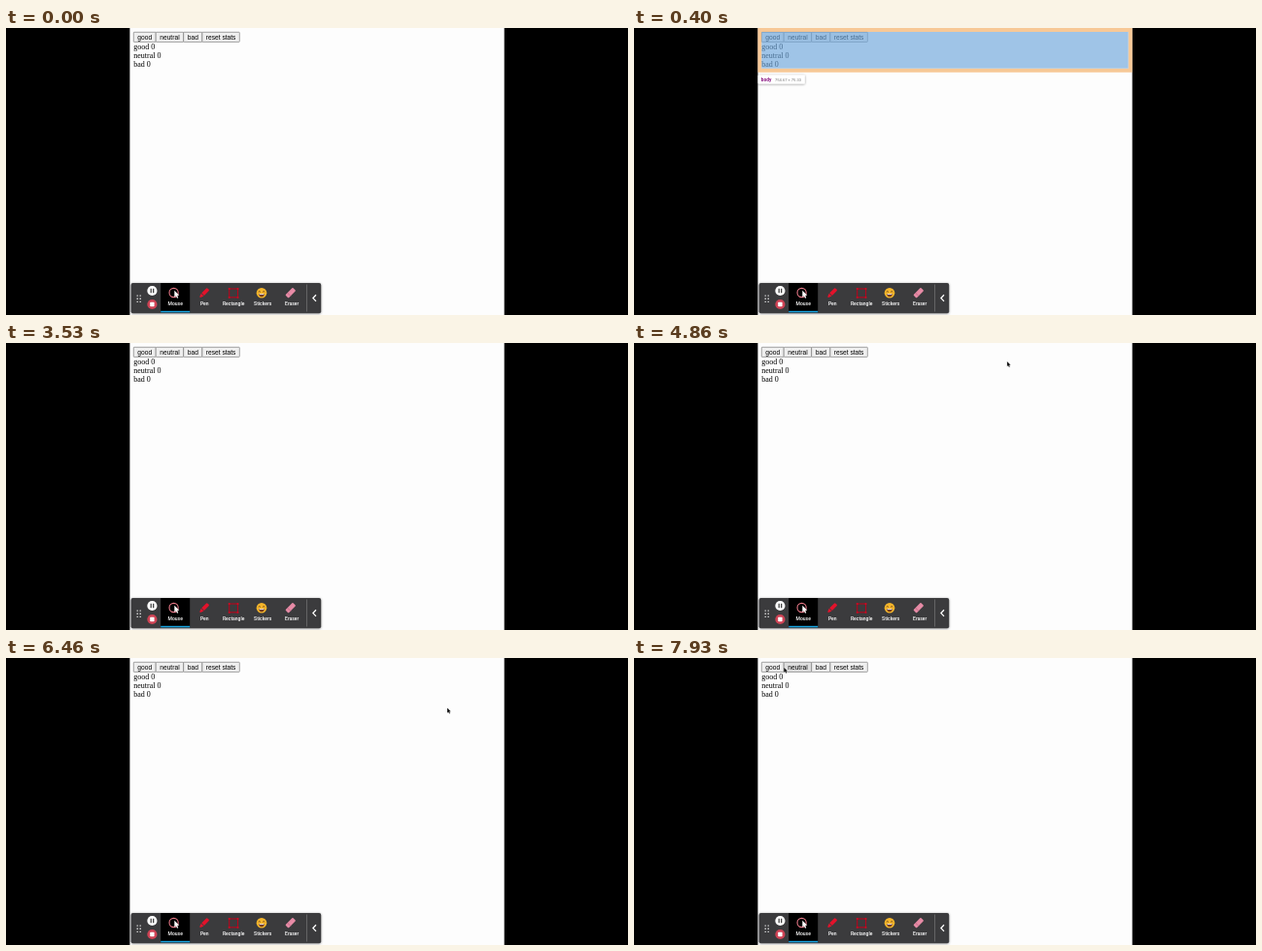
Write an HTML page that moves like this. It is 640 px wide and 296 px high and loops after 8000 ms.

```html
<!DOCTYPE html>
<html lang="en">
<head>
<meta charset="utf-8">
<title>Feedback counter</title>
<style>
  html, body { margin: 0; width: 100%; height: 100%; overflow: hidden; background: #000; }
  svg { display: block; width: 100%; height: 100%; }
  .stat { font: 8px "Liberation Serif", serif; }
  .button rect { fill: #efefef; stroke: #767676; stroke-width: .65; }
  .button.hover rect { fill: #dedede; }
  .button text { font: 6.667px "Liberation Sans", sans-serif; text-anchor: middle; }
  .label { font: 500 5px Roboto, sans-serif; fill: #fff; text-anchor: middle; }
  .tip { font: 4.1px Roboto, sans-serif; fill: #777; }
  .tip .tag { font-size: 4.8px; font-weight: 700; fill: #881280; }
</style>
</head>
<body>
<svg viewBox="0 0 640 296">
  <defs>
    <filter id="shadow" x="-10%" y="-30%" width="120%" height="160%">
      <feDropShadow dx="0" dy=".5" stdDeviation="1" flood-opacity=".45"/>
    </filter>
    <path id="arrow" d="M0 0V5.1L1.2 4L2 5.9L2.9 5.5L2.1 3.7H3.7Z"/>
    <clipPath id="pageClip"><rect x="127.4" width="385.3" height="296"/></clipPath>
  </defs>

  <rect x="127.4" width="385.3" height="296" fill="#fdfdfd"/>
  <g id="buttons"></g>
  <g class="stat">
    <text x="131.3" y="21.9">good 0</text>
    <text x="131.3" y="30.9">neutral 0</text>
    <text x="131.3" y="39.9">bad 0</text>
  </g>

  <g id="inspector">
    <path d="M127.4 0H512.7V45.7H127.4ZM131.3 4V41.7H508.6V4Z" fill="#f6b26b" fill-opacity=".7" fill-rule="evenodd"/>
    <rect x="131.3" y="4" width="377.3" height="37.7" fill="#6fa8dc" fill-opacity=".66"/>
    <g class="tip">
      <rect x="127.6" y="48.6" width="48.2" height="8.8" rx="1" fill="#fff" filter="url(#shadow)"/>
      <text class="tag" x="130.8" y="54.7">body</text>
      <text x="145" y="54.5">754.67 × 75.33</text>
    </g>
  </g>

  <g id="toolbar">
    <rect x="128.6" y="263" width="195.6" height="31.2" rx="2" fill="#3a3a3c" filter="url(#shadow)"/>
    <path d="M135.2 275.5v7.5M138.2 275.5v7.5" stroke="#ddd" stroke-width="1.3" stroke-dasharray="1.3 1.8"/>
    <circle cx="150.4" cy="271" r="5.1" fill="#fff"/>
    <path d="M149.2 268.8v4.4M151.7 268.8v4.4" stroke="#333" stroke-width="1.2"/>
    <circle cx="150.4" cy="285" r="5.1" fill="#cf4355"/>
    <rect x="148.2" y="282.8" width="4.4" height="4.4" rx=".7" fill="#fff"/>

    <rect x="159.2" y="263" width="30" height="30.2" fill="#000"/>
    <rect x="159.2" y="291.8" width="30" height="1.5" fill="#16a3e0"/>
    <circle cx="172.6" cy="273" r="4.6" fill="none" stroke="#e87888" stroke-width="1.1"/>
    <use href="#arrow" transform="translate(173.3 270.8) scale(1.35)" fill="#fff"/>

    <g transform="translate(204 273.2) rotate(45)" fill="#e3122b">
      <path d="M-1.9 -5.2Q0 -6.6 1.9 -5.2V2H-1.9ZM-1.9 2.7H1.9L.6 6.2H-.6Z"/>
    </g>
    <rect x="229.7" y="269" width="8.8" height="8.8" fill="none" stroke="#b3061d" stroke-width="1.1"/>
    <path d="M228.8 269h1.8M237.6 269h1.8M228.8 277.8h1.8M237.6 277.8h1.8" stroke="#c90a22" stroke-width="1.8"/>

    <circle cx="263" cy="273.2" r="5.3" fill="#f6b62b"/>
    <path d="M259.7 272.3q1.1-1.6 2.2 0M264.1 272.3q1.1-1.6 2.2 0" fill="none" stroke="#60381b" stroke-width=".8"/>
    <path d="M260 274.1H266Q265.5 277.3 263 277.3T260 274.1Z" fill="#6b321c"/>
    <path d="M260.5 274.2h5v.9h-5Z" fill="#fff"/>

    <g transform="translate(292.8 273.1) rotate(45)">
      <rect x="-2.3" y="-5.4" width="4.6" height="10.8" rx=".9" fill="#e78ba6"/>
      <path d="M-2.3 2.3H2.3" stroke="#b75f7c" stroke-width=".7"/>
    </g>

    <g class="label">
      <text x="174.2" y="286.4">Mouse</text>
      <text x="204.2" y="286.4">Pen</text>
      <text x="234.2" y="286.4">Rectangle</text>
      <text x="264.2" y="286.4">Stickers</text>
      <text x="294.2" y="286.4">Eraser</text>
    </g>
    <path d="M309.5 264.5V292.5" stroke="#777" stroke-width=".7"/>
    <path d="M319 275.3L315.9 278.6L319 281.9" fill="none" stroke="#fff" stroke-width="1.3"/>
  </g>

  <g clip-path="url(#pageClip)">
    <use id="cursor" href="#arrow" fill="#111" stroke="#fff" stroke-width=".6" paint-order="stroke"/>
  </g>
</svg>

<script>
const LOOP = 8000, STEP = 200 / 3;
const BUTTON_TOP = 4.3, BUTTON_HEIGHT = 10.1;
const $ = id => document.getElementById(id);

const buttons = [
  ["good", 131.3, 22.9], ["neutral", 154.2, 28.5],
  ["bad", 182.7, 19.2], ["reset stats", 201.9, 38.4]
].map(([label, x, width]) => {
  $("buttons").insertAdjacentHTML("beforeend",
    `<g class="button"><rect x="${x}" y="${BUTTON_TOP}" width="${width}" height="${BUTTON_HEIGHT}" rx=".6"/>
     <text x="${x + width / 2}" y="11.7">${label}</text></g>`);
  return { x, width, node: $("buttons").lastElementChild };
});

// Pointer path: [time in ms, x, y]
const path = [
  [4860, 384, 19], [5260, 236, 60], [5460, 233.5, 58], [5530, 232.8, 56.6],
  [5860, 280, -8], [6000, 288, 0], [6260, 491, 46], [6460, 454, 51.6],
  [6600, 462, 50], [6860, 460, 50], [7260, 280, 40], [7660, 164, 13],
  [7930, 154.3, 9.8], [8000, 154.3, 9.8]
];

function pointerAt(time) {
  const i = path.findIndex(key => key[0] > time);
  const [t0, x0, y0] = path[i - 1], [t1, x1, y1] = path[i];
  const p = (time - t0) / (t1 - t0), e = p * p * (3 - 2 * p);
  return [x0 + (x1 - x0) * e, y0 + (y1 - y0) * e];
}

function show(node, visible) {
  node.style.display = visible ? "" : "none";
}

function draw(now) {
  const time = Math.floor((now % LOOP + 7) / STEP) * STEP;
  show($("inspector"), time > 50 && time < 595);

  const pointerShown = time >= path[0][0];
  const [x, y] = pointerShown ? pointerAt(Math.min(time, LOOP - 1)) : [-9, -9];
  show($("cursor"), pointerShown);
  $("cursor").setAttribute("transform", `translate(${x} ${y})`);
  for (const b of buttons) {
    const inside = x >= b.x && x < b.x + b.width && y >= BUTTON_TOP && y < BUTTON_TOP + BUTTON_HEIGHT;
    b.node.classList.toggle("hover", inside);
  }
}

let start;
function tick(now) {
  start ??= now;
  draw(now - start);
  requestAnimationFrame(tick);
}
draw(0);
requestAnimationFrame(tick);
</script>
</body>
</html>
```
